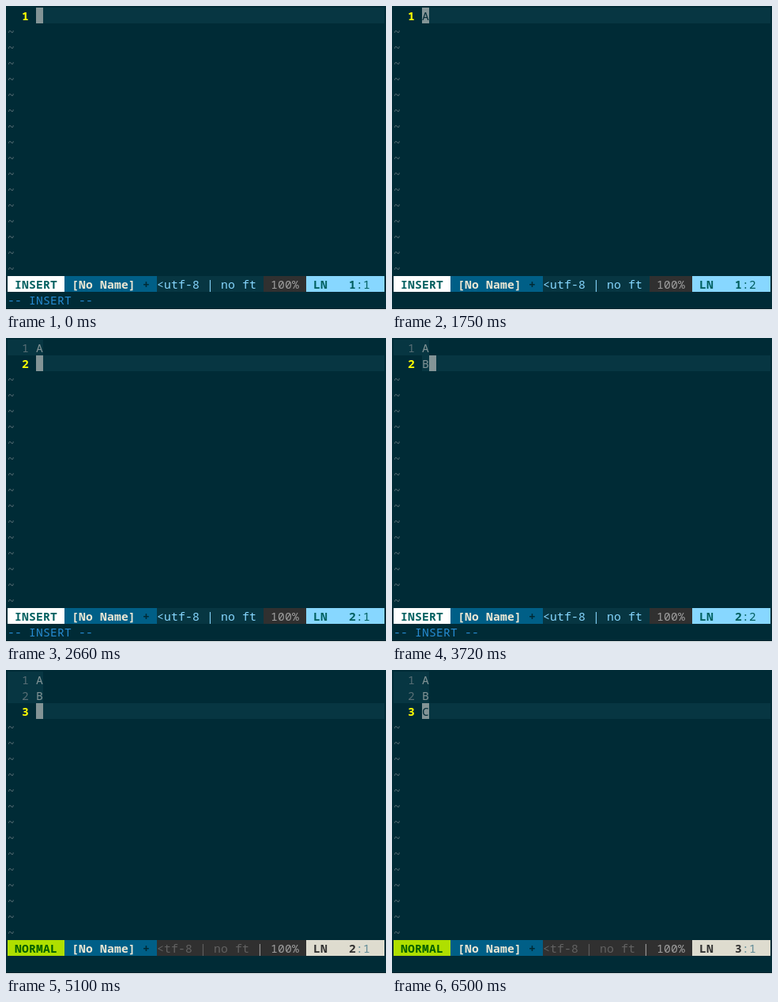
Animation of 481 by 385 pixels, one loop 8 s. Source, as an HTML page:

```html
<!DOCTYPE html>
<html lang="en">
<head>
<meta charset="utf-8">
<title>Editor session</title>
<style>
  html, body {
    margin: 0;
    width: 100%;
    height: 100%;
    overflow: hidden;
    background: #fff;
  }
  #screen {
    position: absolute;
    left: 0;
    top: 0;
    width: 481px;
    height: 384px;
    overflow: hidden;
    background: #002b36;
    font: 11pt/20px "Noto Sans Mono", monospace;
    letter-spacing: 0.2px;
  }
  #screen span {
    position: absolute;
    height: 20px;
    white-space: pre;
  }
</style>
</head>
<body>
<div id="screen"></div>
<script>
const CELL_W = 9, CELL_H = 20, PAD = 2;
const COLS = 53, STATUS_ROW = 17, MESSAGE_ROW = 18;
const LOOP = 8000;
const BASE = '#002b36', LINE = '#073642', TEXT = '#839496', DIM = '#586e75';
const screenEl = document.getElementById('screen');

// Editor states: start time, typed lines, cursor column, mode, and the
// status bar position or message where they lag behind.
const states = [
  { at: 0, lines: '', col: 1, mode: 'INSERT' },
  { at: 1100, lines: 'A', col: 2, mode: 'INSERT' },
  { at: 1750, lines: 'A', col: 1, mode: 'INSERT', position: '1:2', quiet: true },
  { at: 1800, lines: 'A', col: 1, mode: 'NORMAL' },
  { at: 2660, lines: 'A ', col: 1, mode: 'INSERT' },
  { at: 3720, lines: 'AB', col: 2, mode: 'INSERT' },
  { at: 4420, lines: 'AB', col: 1, mode: 'NORMAL' },
  { at: 5100, lines: 'AB ', col: 1, mode: 'NORMAL', position: '2:1' },
  { at: 5150, lines: 'AB ', col: 1, mode: 'INSERT' },
  { at: 5840, lines: 'ABC', col: 2, mode: 'INSERT' },
  { at: 6500, lines: 'ABC', col: 1, mode: 'NORMAL' }
];

const themes = {
  INSERT: {
    modeBg: '#ffffff', modeFg: '#005f5f', infoBg: LINE, infoFg: '#87d7ff',
    info: '<utf-8 | no ft', lnBg: '#87d7ff', lnFg: '#005f5f', colFg: '#005f5f'
  },
  NORMAL: {
    modeBg: '#afdf00', modeFg: '#005f00', infoBg: '#303030', infoFg: '#626262',
    info: '<tf-8 | no ft', lnBg: '#dedccf', lnFg: '#303030', colFg: '#5f8a96'
  }
};

function put(row, col, text, color, bold) {
  const span = document.createElement('span');
  span.textContent = text;
  span.style.left = PAD + col * CELL_W + 'px';
  span.style.top = PAD + row * CELL_H + 'px';
  span.style.color = color;
  if (bold) span.style.fontWeight = 700;
  screenEl.append(span);
}

function fill(row, col, count, color) {
  const span = document.createElement('span');
  span.style.left = PAD + col * CELL_W + 'px';
  span.style.top = PAD + row * CELL_H + 'px';
  span.style.width = count * CELL_W + 'px';
  span.style.background = color;
  screenEl.append(span);
}

function drawBuffer({ lines, col }) {
  const count = Math.max(1, lines.length);
  const cursorRow = count - 1;
  for (let row = 0; row < STATUS_ROW; row++) {
    if (row >= count) {
      put(row, 0, '~', DIM);
      continue;
    }
    const current = row === cursorRow;
    if (current) {
      fill(row, 4, COLS - 4, LINE);
      fill(row, 3 + col, 1, TEXT);
    } else {
      fill(row, 0, 5, LINE);
    }
    put(row, 2, String(row + 1), current ? '#ffff00' : DIM, current);
    const char = (lines[row] || '').trim();
    if (char) put(row, 4, char, current && col === 1 ? BASE : TEXT);
  }
}

function drawStatus({ lines, col, mode, position }) {
  const theme = themes[mode];
  const [line, column] = (position || `${Math.max(1, lines.length)}:${col}`).split(':');
  fill(STATUS_ROW, 0, 8, theme.modeBg);
  fill(STATUS_ROW, 8, 13, '#005f87');
  fill(STATUS_ROW, 21, 15, theme.infoBg);
  fill(STATUS_ROW, 36, 6, '#303030');
  fill(STATUS_ROW, 42, 11, theme.lnBg);
  put(STATUS_ROW, 1, mode, theme.modeFg, true);
  put(STATUS_ROW, 9, '[No Name]', '#eee8d5', true);
  put(STATUS_ROW, 19, '+', BASE, true);
  put(STATUS_ROW, 21, theme.info, theme.infoFg);
  if (mode === 'NORMAL') put(STATUS_ROW, 35, '|', '#9e9e9e');
  put(STATUS_ROW, 37, '100%', '#9e9e9e');
  put(STATUS_ROW, 43, 'LN', theme.lnFg, true);
  put(STATUS_ROW, 48, line, theme.lnFg, true);
  put(STATUS_ROW, 49, ':' + column, theme.colFg);
}

function draw(state) {
  screenEl.replaceChildren();
  drawBuffer(state);
  drawStatus(state);
  if (state.mode === 'INSERT' && !state.quiet) {
    put(MESSAGE_ROW, 0, '-- INSERT --', '#268bd2');
  }
}

let shown = null;
const start = performance.now();

function tick() {
  const time = (performance.now() - start) % LOOP;
  const state = states.findLast(s => s.at <= time);
  if (state !== shown) draw(shown = state);
  requestAnimationFrame(tick);
}
tick();
</script>
</body>
</html>
```
